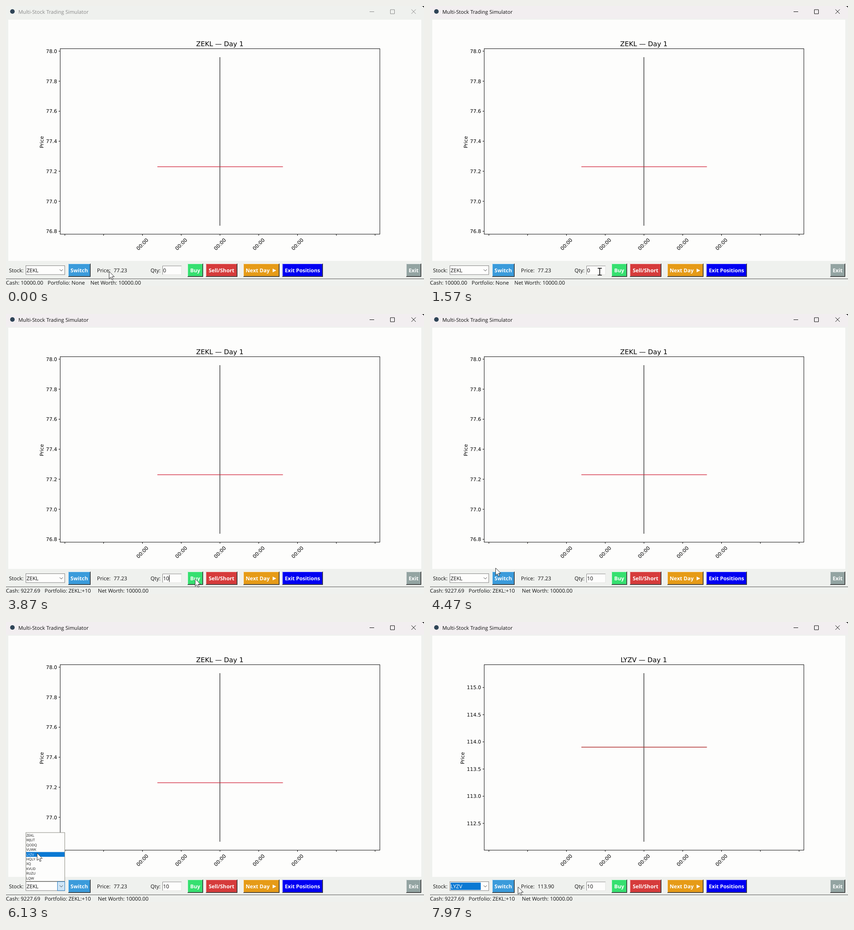
Recreate the animation shown at these times as an HTML page. Size 914 by 613 pixels, loop 8 s.

```html
<!DOCTYPE html>
<html lang="en">
<head>
<meta charset="utf-8">
<title>Trading Simulator</title>
<style>
  html, body { margin: 0; width: 100%; height: 100%; overflow: hidden; background: #eff1ee; }
  svg { display: block; width: 100%; height: 100%; }
  text { text-rendering: geometricPrecision; white-space: pre; }
  .ui { font: 11.5px "Open Sans", "Noto Sans", sans-serif; fill: #111; }
  .plot { font: 10.95px "DejaVu Sans", sans-serif; fill: #000; }
  .mid { text-anchor: middle; }
  .end { text-anchor: end; }
</style>
</head>
<body>
<svg id="stage" viewBox="0 0 914 613"></svg>
<script>
const NS = 'http://www.w3.org/2000/svg';
const stage = document.getElementById('stage');
const LOOP = 8000;

function el(tag, attrs, parent = stage) {
  const node = document.createElementNS(NS, tag);
  for (const k in attrs) node.setAttribute(k, attrs[k]);
  return parent.appendChild(node);
}
const group = (parent = stage) => el('g', {}, parent);
const rect = (x, y, width, height, fill, parent, more) =>
  el('rect', { x, y, width, height, fill, ...more }, parent);
const path = (d, stroke, parent, more) =>
  el('path', { d, stroke, fill: 'none', ...more }, parent);
function text(x, y, str, cls, parent, more) {
  const node = el('text', { x, y, class: cls, ...more }, parent);
  node.textContent = str;
  return node;
}
const show = (node, on) => node.setAttribute('visibility', on ? 'visible' : 'hidden');
const setText = (node, str) => { if (node.textContent !== str) node.textContent = str; };

const STOCKS = ['ZEKL', 'WJUT', 'QODQ', 'VUWK', 'LYZV', 'HQLY', 'XQ', 'KVUD', 'RUZU', 'LQW'];
const FIRST = STOCKS[0], SECOND = STOCKS[4];

// Moments at which the state jumps
const AT = { focus: 960, erase: 2300, one: 2600, zero: 2800, buy: 3760,
             open: 5000, pick: 6450, swap: 7560 };

// Window frame
rect(0, 0, 914, 613, '#eff1ee');
const bar = rect(0, 0, 914, 28, '#eff1ee');
el('path', { d: 'M909 0H914V4Q913 1 909 0Z', fill: '#222' });
el('circle', { cx: 14, cy: 12, r: 5, fill: '#2f4457' });
const caption = text(27, 16.5, 'Multi-Stock Trading Simulator', 'ui', stage, { style: 'font-size:11.2px' });
const controls = path('M795 12.5H805M840.5 8H849.5V17H840.5ZM886.5 7.5L896 17M896 7.5L886.5 17', '#888');
rect(5, 30, 903, 528, '#fdfdfc');

// Chart
function chart(name, labels, y0, step, lineY, color, labelX) {
  const g = group();
  text(467.5, 88, `${name} — Day 1`, 'plot mid', g, { style: 'font-size:14.6px' });
  labels.forEach((label, i) => {
    const y = y0 + step * i;
    path(`M115 ${y}H118.5`, '#000', g);
    text(111.8, y + 4, label, 'plot end', g);
  });
  text(0, 0, 'Price', 'plot mid', g, { transform: `translate(${labelX} 298) rotate(-90)` });
  path('M467.7 112V481', '#111', g, { 'stroke-width': 1.2 });
  path(`M331 ${lineY}H605.5`, color, g, { 'stroke-width': 1.3 });
  return g;
}
const series = (top, step, n) => Array.from({ length: n }, (_, i) => (top - step * i).toFixed(1));
const chartA = chart(FIRST, series(78, 0.2, 7), 98.9, 65.73, 351.9, '#d01c33', 81.7);
const chartB = chart(SECOND, series(115, 0.5, 6), 143.4, 59.5, 274, '#b03030', 74.5);
rect(118.5, 93.5, 699, 406, 'none', stage, { stroke: '#111' });
for (let i = 0; i < 9; i++) {
  const x = 128.8 + 84.78 * i;
  path(`M${x} 499.5V503`, '#000');
  if (i > 1 && i < 7)
    text(0, 4, '00:00', 'plot mid', stage, { transform: `translate(${x - 0.3} 521.5) rotate(-45)` });
}

// Toolbar
text(6.5, 583, 'Stock:', 'ui');
text(199, 583, 'Price:', 'ui');
const price = text(235.5, 583, '', 'ui');
text(316, 583, 'Qty:', 'ui');

function button(x, w, label, fill, labelX = x + w / 2 - 0.3, cls = 'ui mid') {
  rect(x, 564, w, 29, fill);
  path(`M${x + 0.5} 592V564.5H${x + w - 1}`, '#fff', stage, { opacity: 0.75 });
  path(`M${x + 1} 591.5H${x + w - 1.5}V565`, '#555', stage, { opacity: 0.6 });
  path(`M${x} 592.5H${x + w - 0.5}V564`, '#222');
  text(labelX, 583, label, cls, stage, { style: 'font-weight:700;fill:#fff' });
}
button(136, 49, 'Switch', '#3a9bdb');
button(397, 34, 'Buy', '#36e070');
button(437, 69, 'Sell/Short', '#d63b3b');
button(519, 79, 'Next Day', '#e69b17', 524, 'ui');
el('path', { d: 'M583 575L591 579L583 583Z', fill: '#fff' });
button(604, 89, 'Exit Positions', '#0000f2');
button(875, 33, 'Exit', '#93a4a2');

// Quantity entry
rect(342, 568.5, 42, 20, '#fdfdfc');
path('M342.5 588V569H384', '#8a8a8a');
path('M343 588.2H383.7V569', '#e2e3e0');
const qty = text(343.5, 583, '', 'ui');
const caret = path('M0 571.5V586.5', '#000');

// Stock selector
rect(43.5, 568.5, 85, 19.5, '#fdfdfc', stage, { stroke: '#858585' });
const picked = rect(45, 570.5, 66, 16, '#0b79d3');
const chosen = text(45, 583, '', 'ui');
const arrowBox = rect(112.5, 568.5, 16, 19.5, '#cfe5f6', stage, { stroke: '#2b7fc4' });
path('M117.3 576.7L120.8 580.2L124.3 576.7', '#444');

const list = group();
const ROW = 10.45, LIST_TOP = 461.8;
rect(43.5, 461, 85, 106.5, '#fdfdfc', list, { stroke: '#8c8c83' });
const hover = rect(44, 0, 84, ROW, '#0b79d3', list);
const rows = STOCKS.map((s, i) =>
  text(44.5, LIST_TOP + ROW * (i + 0.5) + 2.7, s, 'ui', list, { style: 'font-size:7.6px' }));

// Status bar
path('M0 597.3H914', '#555');
const cash = text(0, 610, '', 'ui');
const folio = text(0, 610, '', 'ui');
const worth = text(0, 610, 'Net Worth: 10000.00', 'ui');

// Pointer
const arrow = path('M0 0V16L3.7 12.6L6.2 18.3L8.7 17.2L6.3 11.7H11.4Z', '#333', stage, { fill: '#fff' });
const beam = path('M-4.3 -6.8H4.7M.2 -6.8V8.2M-4.3 8.2H4.7', '#000', stage, { 'stroke-width': 1.5 });

// time, x, y
const TRACK = [
  [0, 225.5, 581], [630, 367, 588], [860, 371, 581], [3150, 371, 581],
  [3560, 414, 580], [3860, 414, 580], [4470, 143.5, 556], [4800, 121, 577],
  [5120, 121, 577], [5750, 70, 512], [6130, 68, 506], [6500, 68, 506],
  [7150, 162, 579], [7600, 164, 580], [7970, 192.5, 580], [8000, 193, 580]
];
function pointer(t) {
  let i = 1;
  while (i < TRACK.length - 1 && t > TRACK[i][0]) i++;
  const [t0, x0, y0] = TRACK[i - 1], [t1, x1, y1] = TRACK[i];
  const u = (t - t0) / (t1 - t0), k = u * u * (3 - 2 * u);
  return [x0 + (x1 - x0) * k, y0 + (y1 - y0) * k];
}

function draw(t) {
  const [x, y] = pointer(t);
  const active = t >= AT.focus, open = t >= AT.open && t < AT.pick;
  const bought = t >= AT.buy, chose = t >= AT.pick, swapped = t >= AT.swap;

  bar.setAttribute('fill', active ? '#f2eef0' : '#eff1ee');
  caption.style.fill = active ? '#111' : '#8a8a8a';
  controls.setAttribute('stroke', active ? '#111' : '#888');

  show(chartA, !swapped);
  show(chartB, swapped);
  setText(price, swapped ? '113.90' : '77.23');

  const amount = t < AT.erase ? '0' : t < AT.one ? '' : t < AT.zero ? '1' : '10';
  setText(qty, amount);
  const lastKey = [AT.zero, AT.one, AT.erase, AT.focus].find(k => t >= k);
  show(caret, active && t < AT.open && (t - lastKey) % 900 < 600);
  caret.setAttribute('transform', `translate(${344 + 6.6 * amount.length} 0)`);

  setText(chosen, chose ? SECOND : FIRST);
  chosen.style.fill = chose ? '#fff' : '#111';
  show(picked, chose);
  show(arrowBox, open);
  show(list, open);
  const inList = x > 44 && x < 128 && y < 566;
  const row = inList ? Math.floor((y - LIST_TOP) / ROW) : 0;
  hover.setAttribute('y', LIST_TOP + ROW * row);
  rows.forEach((r, i) => { r.style.fill = i === row ? '#fff' : '#111'; });

  setText(cash, bought ? 'Cash: 9227.69' : 'Cash: 10000.00');
  setText(folio, bought ? `Portfolio: ${FIRST}:+10` : 'Portfolio: None');
  folio.setAttribute('x', bought ? 84.5 : 91);
  worth.setAttribute('x', bought ? 201 : 184.5);

  const inEntry = x > 343 && x < 384 && y > 569 && y < 587.5;
  show(arrow, !inEntry);
  show(beam, inEntry);
  for (const p of [arrow, beam]) p.setAttribute('transform', `translate(${x} ${y})`);
}

const start = performance.now();
function tick() {
  draw((performance.now() - start) % LOOP);
  requestAnimationFrame(tick);
}
tick();
</script>
</body>
</html>
```
